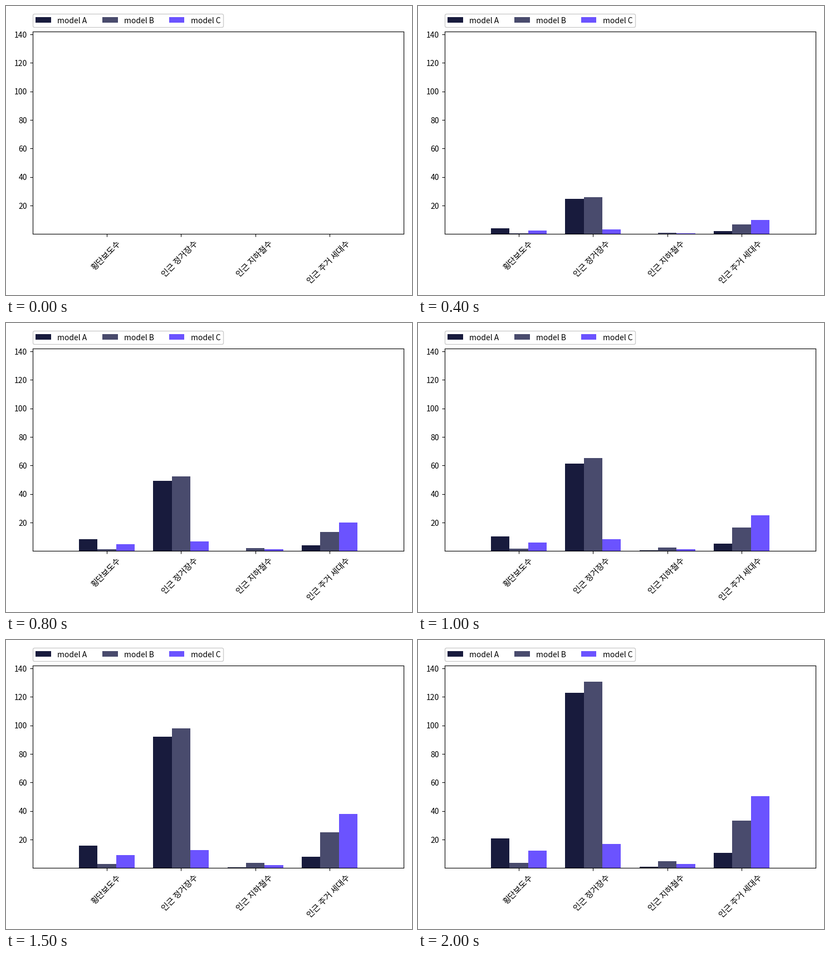
Write a matplotlib script that moves like this. It is 729 px wide and 520 px high and loops after 2.1 s.

```python
import numpy as np
import matplotlib.pyplot as plt
from matplotlib.animation import FuncAnimation
from matplotlib.patches import FancyBboxPatch, Rectangle

W, H, DPI = 729, 520, 100
FRAMES, INTERVAL = 21, 100

LABELS = ["횡단보도수", "인근 정거장수", "인근 지하철수", "인근 주거 세대수"]
MODELS = {
    "model A": ("#181b3d", [21.0, 123.0, 1.0, 10.6]),
    "model B": ("#494b6d", [3.8, 130.51, 5.0, 33.4]),
    "model C": ("#6b53ff", [12.3, 17.0, 3.0, 50.6]),
}
BAR = 0.25

plt.rcParams["font.family"] = ["Noto Sans CJK JP", "DejaVu Sans"]
plt.rcParams["font.size"] = 10
plt.rcParams["toolbar"] = "None"

fig = plt.figure(figsize=(W / DPI, H / DPI), dpi=DPI, facecolor="white")

# Chart area, given by its pixel edges
left, top, right, bottom = 47.8, 46.1, 714.2, 410.2
ax = fig.add_axes([left / W, 1 - bottom / H, (right - left) / W, (bottom - top) / H])
ax.set_xlim(0, 5)
ax.set_ylim(0.132, 141.915)
ax.set_xticks(range(1, 5), [""] * 4)
ax.set_yticks(range(20, 141, 20))
for i, label in enumerate(LABELS, 1):
    ax.annotate(label, (i, 0), xycoords=ax.get_xaxis_transform(),
                xytext=(-1, -7.5), textcoords="offset points",
                rotation=45, ha="center", va="top", size=10.7)

x = np.arange(1, 5)
groups = []
for k, (color, values) in enumerate(MODELS.values()):
    bars = ax.bar(x + (k - 1) * BAR, np.zeros(4), BAR, color=color, linewidth=0)
    groups.append((bars, values))

# Legend row above the chart, in pixel coordinates
key = fig.add_axes([0, 0, 1, 1])
key.set_xlim(0, W)
key.set_ylim(H, 0)
key.axis("off")
key.add_patch(FancyBboxPatch((51.3, 17.3), 336.4, 18.4,
                             boxstyle="round,pad=2.8,rounding_size=2.8",
                             facecolor="white", edgecolor="0.8", linewidth=1))
for k, (name, (color, _)) in enumerate(MODELS.items()):
    x0 = 53 + 119.8 * k
    key.add_patch(Rectangle((x0, 20), 27.78, 10, facecolor=color, linewidth=0))
    key.text(x0 + 39, 31, name, ha="left", va="baseline")


def update(i):
    grow = i / (FRAMES - 1)
    changed = []
    for bars, values in groups:
        for bar, value in zip(bars, values):
            bar.set_height(value * grow)
            changed.append(bar)
    return changed


anim = FuncAnimation(fig, update, frames=FRAMES, interval=INTERVAL,
                     init_func=lambda: update(0), repeat=True, repeat_delay=0,
                     blit=False)
plt.show()
```
